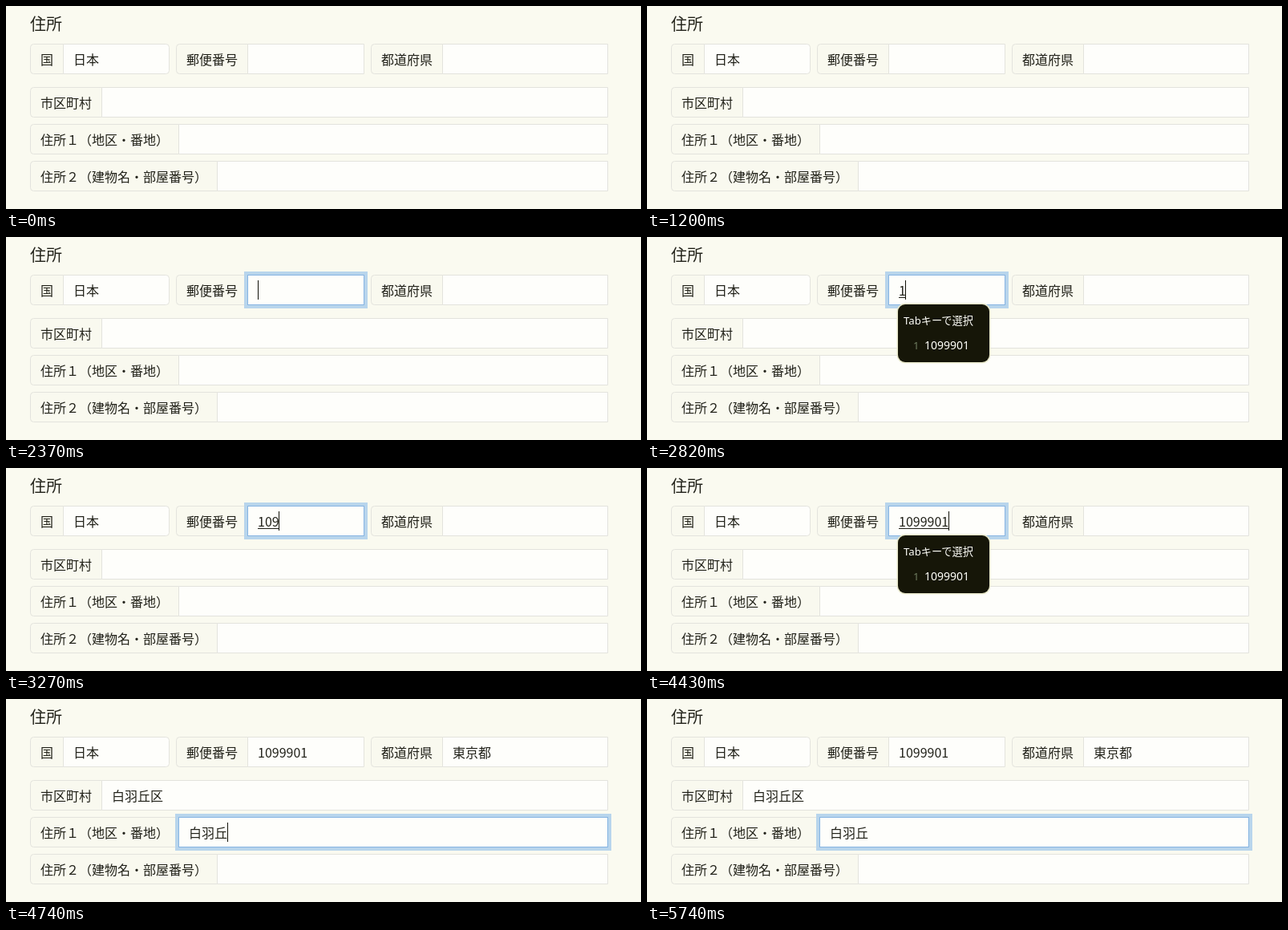
An HTML page that plays this animation: 792x253 px, repeating every 6.98 s.

```html
<!DOCTYPE html>
<html lang="ja">
<head>
<meta charset="utf-8">
<title>住所フォーム</title>
<style>
html, body { margin: 0; width: 100%; height: 100%; overflow: hidden; background: #fafaf0; }
svg { display: block; }
text { font: 16px "Noto Sans CJK JP", "Noto Sans CJK", sans-serif; fill: #212119; white-space: pre; }
.title { font-size: 20px; }
.label { fill: #f9f9ef; }
.input { fill: #fefefb; }
.label, .input { stroke: #e3e3dd; }
.ring rect { fill: none; }
.glow { stroke: #b8d5ec; stroke-width: 4; }
.edge { stroke: #86b4e2; }
.popup text { font: 13.2px "Noto Sans", "Noto Sans CJK JP", "Noto Sans CJK", sans-serif; fill: #fffffa; }
.popup .choice { font-size: 14px; }
.popup .index { font-size: 13px; fill: #6f7d60; }
</style>
</head>
<body>
<svg width="792" height="253" viewBox="0 0 792 253">
  <text class="title" x="30" y="30">住所</text>
  <g id="form"></g>
  <path id="underline" stroke="#212119"/>
  <rect id="caret" width="1" height="24" fill="#111108"/>
  <g id="popup" class="popup">
    <rect x="313" y="84" width="114" height="72" rx="9" fill="#161608" stroke="#e9e9cc" stroke-width="3" paint-order="stroke"/>
    <text x="320" y="109">Tabキーで選択</text>
    <text class="index" x="332" y="140">1</text>
    <text id="choice" class="choice" x="346" y="140"></text>
  </g>
</svg>
<script>
const LOOP = 6980, COMMIT = 4540, FILL = 4580;
const CODE = "1099901", TOWN = "白羽丘", DIGIT = 8.88;
const $ = id => document.getElementById(id);

// Each field: left edge, divider, right edge, top, label, right corner radius
const fields = {
  country: [30, 71, 204, 47, "国", 4],
  code: [212, 301, 447, 47, "郵便番号", 0],
  region: [455, 544, 751, 47, "都道府県", 0],
  city: [30, 119, 751, 101, "市区町村", 0],
  line1: [30, 215, 751, 147, "住所１（地区・番地）", 0],
  line2: [30, 263, 751, 193, "住所２（建物名・部屋番号）", 0]
};

function box(kind, x1, x2, y, left, right) {
  const l = x1 + .5, r = x2 - .5, t = y + .5, b = y + 37.5;
  return `<path class="${kind}" d="M${l + left} ${t}H${r - right}q${right} 0 ${right} ${right}V${b - right}` +
    `q0 ${right} ${-right} ${right}H${l + left}q${-left} 0 ${-left} ${-left}V${t + left}q0 ${-left} ${left} ${-left}z"/>`;
}

function ring(id, x1, x2, y) {
  const rect = (kind, grow) => `<rect class="${kind}" x="${x1 - grow}" y="${y - grow}" ` +
    `width="${x2 - x1 + 2 * grow}" height="${38 + 2 * grow}"/>`;
  return `<g id="${id}Ring" class="ring" opacity="0">${rect("glow", 2)}${rect("edge", -.5)}</g>`;
}

$("form").innerHTML = Object.entries(fields).map(([id, [x1, mid, x2, y, label, round]]) =>
  box("label", x1, mid + 1, y, 4, 0) + box("input", mid, x2, y, 0, round) + ring(id, mid, x2, y) +
  `<text x="${x1 + 13}" y="${y + 26}">${label}</text><text id="${id}" x="${mid + 13}" y="${y + 26}"></text>`
).join("");
$("country").textContent = "日本";
$("choice").textContent = CODE;

const ease = (t, start, span) => {
  const p = Math.min(1, Math.max(0, (t - start) / span));
  return p * p * (3 - 2 * p);
};
const within = (t, a, b) => t >= a && t < b;
const show = (id, on) => $(id).setAttribute("visibility", on ? "visible" : "hidden");

// [time, digits typed]
const typing = [[2590, 1], [3010, 2], [3270, 3], [3550, 5], [3870, 6], [3930, 7]];

function draw(t) {
  const count = typing.reduce((n, [at, digits]) => t >= at ? digits : n, 0);
  const filled = t >= FILL;
  const end = 314 + count * DIGIT;

  $("code").textContent = CODE.slice(0, count);
  $("region").textContent = filled ? "東京都" : "";
  $("city").textContent = filled ? TOWN + "区" : "";
  $("line1").textContent = filled ? TOWN : "";

  $("codeRing").setAttribute("opacity", ease(t, 1490, 170) - ease(t, FILL, 160));
  $("line1Ring").setAttribute("opacity", ease(t, FILL, 160));

  $("underline").setAttribute("d", `M314 75.5H${end}`);
  show("underline", count && t < COMMIT);
  $("caret").setAttribute("x", filled ? 276 : Math.floor(end));
  $("caret").setAttribute("y", filled ? 154 : 54);
  show("caret", within(t, 1500, 5740));

  // The popup slides up as it first fades in, then blinks off while typing
  const opened = ease(t, 2640, 180);
  $("popup").setAttribute("opacity", opened - ease(t, COMMIT, 120));
  $("popup").setAttribute("transform", `translate(0 ${10 * (1 - opened)})`);
  show("popup", !within(t, 3010, 3300) && !within(t, 3870, 3930));
}

const start = performance.now();
function tick() {
  draw((performance.now() - start) % LOOP);
  requestAnimationFrame(tick);
}
tick();
</script>
</body>
</html>
```
